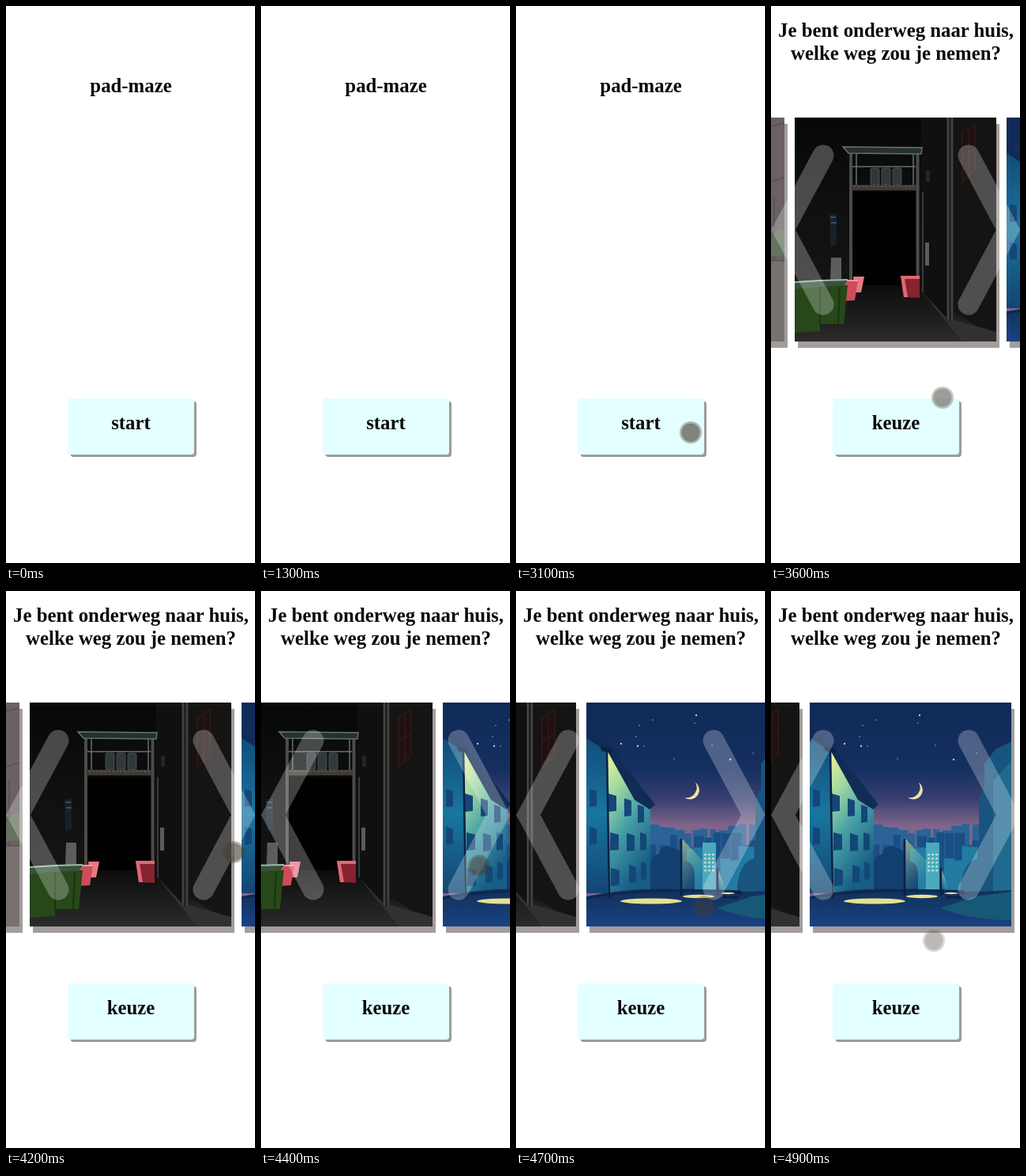
Write an HTML page that moves like this. It is 315 px wide and 704 px high and loops after 5 s.

```html
<!DOCTYPE html>
<html lang="nl">
<head>
<meta charset="utf-8">
<style>
html, body { margin: 0; height: 100%; overflow: hidden; background: #fff; }
svg { display: block; }
text { font: bold 24.8px "Liberation Serif", "Times New Roman", serif; text-anchor: middle; fill: #0a0a0a; }
.arrow { fill: none; stroke: #fff; stroke-opacity: .25; stroke-width: 27; stroke-linecap: round; }
</style>
</head>
<body>
<svg width="315" height="704" viewBox="0 0 315 704">
  <defs>
    <linearGradient id="floor" x2="0" y2="1"><stop stop-color="#0c0c0c"/><stop offset="1" stop-color="#2b2b2b"/></linearGradient>
    <linearGradient id="wall" x2="0" y2="1"><stop stop-color="#060707"/><stop offset=".4" stop-color="#0f100f"/><stop offset="1" stop-color="#171716"/></linearGradient>
    <linearGradient id="sky" x2="0" y2="1"><stop stop-color="#0f2a58"/><stop offset=".3" stop-color="#152f60"/><stop offset=".43" stop-color="#373f70"/><stop offset=".55" stop-color="#80658b"/></linearGradient>
    <linearGradient id="lit" x2=".4" y2="1"><stop stop-color="#f2f59a"/><stop offset=".3" stop-color="#a0d8a2"/><stop offset=".6" stop-color="#45a0a5"/><stop offset="1" stop-color="#185d88"/></linearGradient>
    <linearGradient id="side" x2="0" y2="1"><stop stop-color="#124a78"/><stop offset=".5" stop-color="#18769f"/><stop offset="1" stop-color="#134573"/></linearGradient>
    <linearGradient id="cone" x2=".5" y2="1"><stop stop-color="#f6f5a0"/><stop offset="1" stop-color="#6bc0b5" stop-opacity=".1"/></linearGradient>
    <linearGradient id="ground" x2="0" y2="1"><stop stop-color="#123058"/><stop offset="1" stop-color="#194284"/></linearGradient>
  </defs>

  <g id="intro"><text x="158" y="109">pad-maze</text></g>

  <g id="quiz">
    <text x="158" y="39">Je bent onderweg naar huis,</text>
    <text x="158" y="68">welke weg zou je nemen?</text>
    <g id="cards">
      <g fill="#a39d9b">
        <rect x="-234" y="149" width="255" height="283"/>
        <rect x="34" y="149" width="255" height="283"/>
        <rect x="302" y="149" width="255" height="283"/>
      </g>

      <!-- street -->
      <svg x="-238" y="141" width="255" height="283" viewBox="-238 141 255 283">
        <rect x="-238" y="141" width="255" height="283" fill="#6b6163"/>
        <rect x="-238" y="322" width="255" height="102" fill="#77716f"/>
        <path d="M0 152 17 148M0 222 17 217M4 240V322M0 322H17" stroke="#51484a" fill="none"/>
        <path d="M0 296Q6 278 17 282V316H0Z" fill="#65725f"/>
      </svg>

      <!-- alley -->
      <svg x="30" y="141" width="255" height="283" viewBox="30 141 255 283">
        <rect x="30" y="141" width="255" height="283" fill="url(#wall)"/>
        <path d="M98 352H188L285 424H30V400Z" fill="url(#floor)"/>
        <path d="M190 141H222V398L190 360Z" fill="#0f100f"/>
        <path d="M231 141H285V412L231 388Z" fill="#151413"/>
        <rect x="100" y="186" width="86" height="50" fill="#0b0c0c"/>
        <rect x="103" y="235" width="81" height="118" fill="#010101"/>
        <path d="M101 182V346M185.500 182V342" stroke="#4b4b49" stroke-width="4"/>
        <path d="M91 178 191 179 190 187 98 186Z" fill="#26302f" stroke="#62736f" stroke-width="1.5"/>
        <path d="M103 203H183M108 187V226M180 187V226" stroke="#65706e" stroke-width="1.5"/>
        <g id="barrels" fill="#30383a" stroke="#596365" stroke-width=".7"></g>
        <rect x="102" y="226" width="82" height="7" fill="#403934"/>
        <path d="M104 228H183" stroke="#6e6057" stroke-dasharray="3 2"/>
        <path d="M190 360 222 394 285 412V424H242Z" fill="#313130"/>
        <path d="M192 235V362" stroke="#393a39" stroke-width="2"/>
        <rect x="222" y="141" width="9" height="258" fill="#232323"/>
        <path d="M224 141V398M229 141V399" stroke="#4c4c4a" stroke-width="1.6"/>
        <path d="M242 160 258 150V207L242 223Z" fill="#1f1110"/>
        <path d="M242 160 258 150V207L242 223ZM250 155V215M242 190 258 180" fill="none" stroke="#36201d"/>
        <rect x="195" y="299" width="5" height="29" fill="#5b5b5a"/>
        <rect x="196" y="208" width="5" height="14" fill="#252524"/>
        <path d="M74 264 83 262V301L75 304Z" fill="#18202a"/>
        <path d="M75 267H82M76 274H83" stroke="#405a70" stroke-width="1.5"/>
        <path d="M76 318H89V346H75Z" fill="#5c5d5d"/>
        <path d="M104 342H118L114 362H106Z" fill="#e87983"/>
        <path d="M91 346H110L106 372 89 373Z" fill="#cf4c5b"/>
        <path d="M91 347H110" stroke="#f197a0" stroke-width="2"/>
        <path d="M164 341H188V369L168 368Z" fill="#87232f"/>
        <path d="M164 341H188V345H169L173 368H168Z" fill="#df6975"/>
        <path d="M30 353H97L92 402H62V411L30 413Z" fill="#274819"/>
        <path d="M62 355V404M87 355 85 402" stroke="#1a3311" stroke-width="2"/>
        <path d="M30 349 60 347 97 346 93 353 62 355 30 358Z" fill="#35543b"/>
        <path d="M30 349 62 347 97 346" stroke="#9fb8ab" stroke-width="2" fill="none"/>
      </svg>

      <!-- night city -->
      <svg x="298" y="141" width="255" height="283" viewBox="49 141 255 283">
        <rect x="49" y="141" width="255" height="283" fill="url(#sky)"/>
        <g id="stars" fill="#b5cbe2"></g>
        <path d="M187 242A11 11 0 0 1 173 261 13 13 0 0 0 187 242Z" fill="#f0e0ac"/>
        <g id="towers"></g>
        <path d="M130 347Q130 334 140 333 146 318 160 325 172 328 171 340 187 343 186 360V380H130Z" fill="#123f70"/>
        <path d="M169 312 200 345V376H170Z" fill="url(#cone)" opacity=".6"/>
        <path d="M215 350 225 376H214Z" fill="url(#cone)"/>
        <path d="M240 372Q244 340 263 338V262L270 250V218L284 200 304 190V405H240Z" fill="#18547e"/>
        <path d="M281 240 304 215V385H281Z" fill="#206a90"/>
        <path d="M49 181 76 199V382H49Z" fill="url(#side)"/>
        <path d="M76 202 112 260 130 274V376L76 382Z" fill="url(#lit)"/>
        <path d="M49 175 75 192 136 270 129 276 110 264 76 203 49 186Z" fill="#102c55"/>
        <g id="panes" fill="#144777"></g>
        <path d="M49 386Q120 372 180 378 250 382 304 378V424H49Z" fill="url(#ground)"/>
        <path d="M214 401Q240 392 258 386L304 380V416Q254 416 214 401Z" fill="#165876"/>
        <path d="M49 388Q120 375 245 380" fill="none" stroke="#0d2850" stroke-width="3"/>
        <path d="M75 200 78 388M169 313V385M215 350V385M217 382H245M222 387H242" stroke="#0b2147" stroke-width="2.6"/>
        <path d="M67 196 82 200 81 205 68 202Z" fill="#0b2147"/>
        <g fill="#e6e28c">
          <ellipse cx="131" cy="392" rx="39" ry="3.5"/>
          <ellipse cx="191" cy="386" rx="20" ry="2.2"/>
          <ellipse cx="228" cy="382" rx="9" ry="1.2"/>
        </g>
      </svg>
    </g>
    <path class="arrow" d="M66 189 15.5 283 66 377"/>
    <path class="arrow" d="M250 189 300 283 250 377"/>
  </g>

  <rect x="81.500" y="499.500" width="159.500" height="70.500" rx="4" fill="#9c9c9c"/>
  <rect x="78" y="496" width="160" height="71" rx="4" fill="#e3ffff"/>
  <text id="label" x="158" y="535"></text>

  <g id="dot" fill="#463c32">
    <circle r="14" opacity=".5"/>
    <circle r="11.500" opacity=".75"/>
  </g>
</svg>

<script>
const $ = id => document.getElementById(id);
const rect = (x, y, w, h, extra = '') => `<rect x="${x}" y="${y}" width="${w}" height="${h}" ${extra}/>`;

let seed = 7;
const rnd = () => (seed = seed * 16807 % 2147483647) / 2147483647;

$('barrels').innerHTML = [126, 140, 154].map(x => rect(x, 205, 11, 21, 'rx="2"')).join('');

$('stars').innerHTML = [[93, 193], [116, 170], [112, 184], [114, 196], [133, 163], [122, 196], [188, 157], [186, 167],
  [208, 195], [231, 213], [260, 205], [160, 212]]
  .map(([x, y], i) => `<circle cx="${x}" cy="${y}" r="${i % 3 ? .7 : 1.2}"/>`).join('');

// Three rows of blocks, tallest around x = 215
function towers() {
  let out = '';
  for (const [base, color] of [[282, '#2a6396'], [298, '#1a4f85'], [318, '#217ba3']])
    for (let x = 128; x < 264; x += 8 + rnd() * 6) {
      const y = base + rnd() * 22 + Math.abs(x - 215) * .15;
      out += rect(x, y, 7 + rnd() * 7, 385 - y, `fill="${color}"`);
    }
  out += rect(196, 318, 17, 60, 'fill="#4aa9bd"');
  for (let i = 0; i < 15; i++)
    out += rect(198 + i % 3 * 5, 332 + (i / 3 | 0) * 5, 3, 2.5, 'fill="#b5dccd"');
  return out;
}
$('towers').innerHTML = towers();

$('panes').innerHTML = [[53, 250, 9], [53, 298, 9], [77, 256, 10], [97, 262, 9], [114, 270, 8],
  [79, 305, 11], [100, 306, 10], [117, 305, 8], [80, 350, 11], [103, 346, 9], [118, 342, 7]]
  .map(([x, y, w]) => `<path d="M${x} ${y}l${w} 3v19l${-w} 1z"/>`).join('');

// time, x, y, opacity
const touch = [
  [2500, 279, 552, .35], [2700, 262, 546, .6], [3000, 222, 531, .65], [3100, 221, 539, .72],
  [3600, 217, 495, .58], [3700, 217, 495, .58], [4000, 300, 321, .6], [4200, 288, 330, .7],
  [4500, 270, 356, .6], [4900, 206, 442, .4]
];

function touchAt(t) {
  const i = touch.findIndex(k => k[0] >= t);
  const b = touch[i], a = touch[Math.max(0, i - 1)];
  const p = b === a ? 0 : (t - a[0]) / (b[0] - a[0]);
  return a.map((v, n) => v + (b[n] - v) * p);
}

// cubic-bezier(.25, .1, .25, 1)
function ease(x) {
  if (x <= 0 || x >= 1) return x <= 0 ? 0 : 1;
  const curve = (u, a, b) => 3 * a * u * (1 - u) ** 2 + 3 * b * u * u * (1 - u) + u ** 3;
  let lo = 0, hi = 1;
  for (let i = 0; i < 24; i++) {
    const mid = (lo + hi) / 2;
    if (curve(mid, .25, .25) < x) lo = mid; else hi = mid;
  }
  return curve(lo, .1, 1);
}

const show = (id, on) => $(id).setAttribute('visibility', on ? 'visible' : 'hidden');

function draw(now) {
  const t = Math.floor(now % 5000 / 100) * 100;
  const quiz = t >= 3300;
  show('intro', !quiz);
  show('quiz', quiz);
  $('label').textContent = quiz ? 'keuze' : 'start';
  $('cards').setAttribute('transform', `translate(${Math.round(-268 * ease((t - 4216) / 1010))})`);
  show('dot', t >= 2500);
  if (t >= 2500) {
    const [, x, y, alpha] = touchAt(t);
    $('dot').setAttribute('transform', `translate(${x} ${y})`);
    $('dot').setAttribute('opacity', alpha);
  }
}

const start = performance.now();
function loop() {
  draw(performance.now() - start);
  requestAnimationFrame(loop);
}
loop();
</script>
</body>
</html>
```
